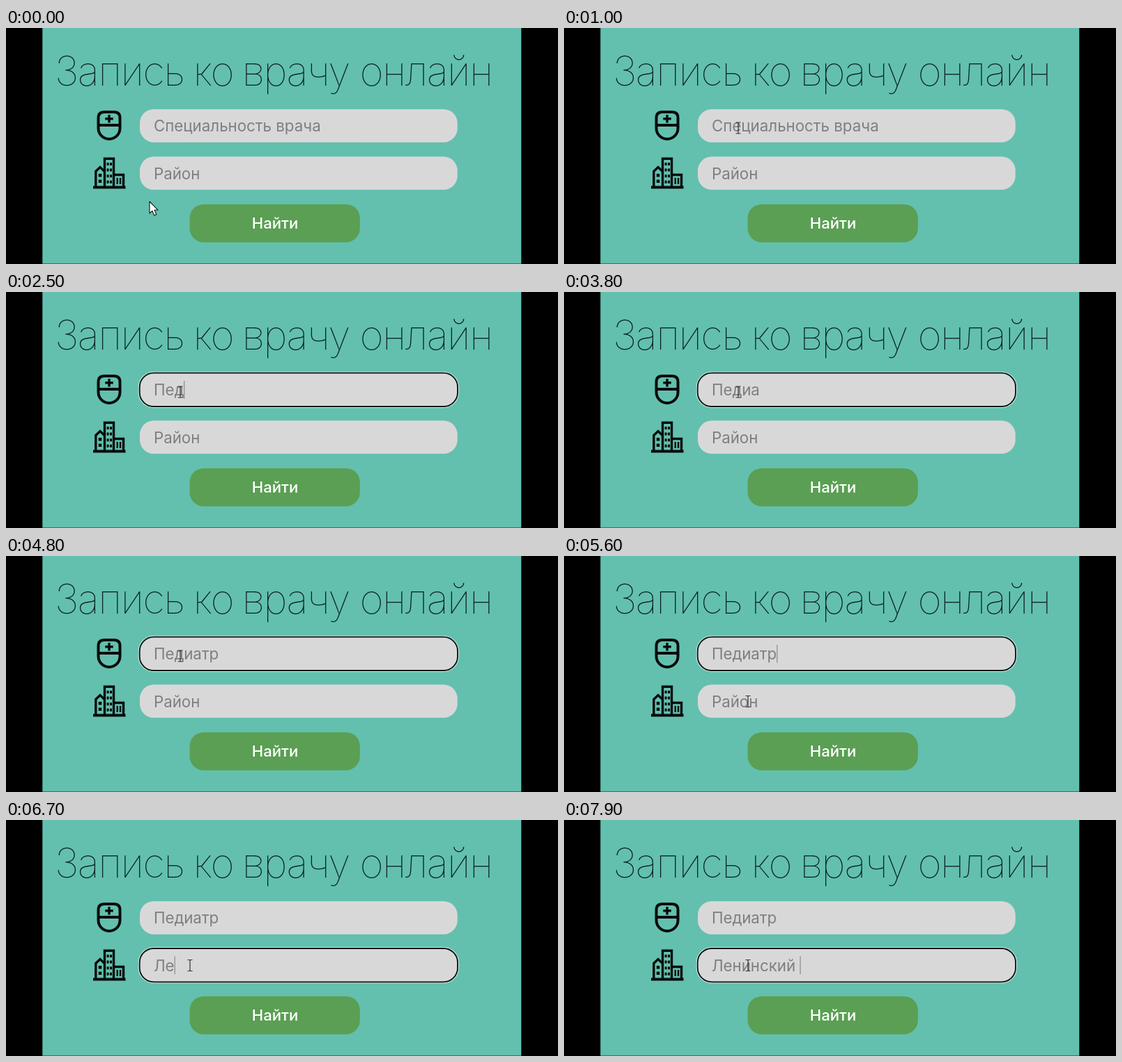
An HTML page for the animation above (8000 ms loop, 792 px wide and 340 px high).

```html
<!DOCTYPE html>
<html lang="ru">
<head>
<meta charset="utf-8">
<title>Запись ко врачу</title>
<style>
  html, body { margin: 0; width: 100%; height: 100%; overflow: hidden; background: #000; }
  svg { display: block; width: 100vw; height: 100vh; }
  text { font-family: Inter, Roboto, sans-serif; font-size: 22.3px; white-space: pre; }
  .title text { font-size: 59px; font-weight: 100; fill: #0c2422; font-optical-sizing: none; letter-spacing: -1.6px; }
  .value { fill: #7f7e80; }
  .button { font-size: 22.1px; font-weight: 500; fill: #fff; }
  .ink { fill: none; stroke: #070b0b; }
</style>
</head>
<body>
<svg viewBox="0 0 792 340">
  <rect width="792" height="340" fill="#000"/>
  <rect x="52.3" width="687" height="339.6" fill="#63c0ae"/>

  <g class="title">
    <text x="70" y="82.5">Запись</text>
    <text x="268.5" y="82.5">ко</text>
    <text x="338.5" y="82.5">врачу</text>
    <text x="507.5" y="82.5">онлайн</text>
  </g>

  <g class="ink" stroke-width="4">
    <path d="M141 121H155Q163.500 121 163.500 129.500V144.500A15.500 15.500 0 0 1 132.500 144.500V129.500Q132.500 121 141 121ZM132.500 140H163.500"/>
    <path d="M148 125V136.500M142.300 130.700H153.700" stroke-width="3.400"/>
  </g>

  <g class="ink" stroke-width="3.400">
    <path d="M125 229.600H171.500" stroke-width="4"/>
    <path d="M128.800 229V206.500L135 200.500L141.300 206.500"/>
    <path d="M141.500 229V188.300H154.500V229"/>
    <path d="M154.500 211.500H168.500V229"/>
    <path d="M146.100 194V224M150.500 194V224" stroke-width="3" stroke-dasharray="4 4.600"/>
    <path d="M135 210V225" stroke-width="4.500" stroke-dasharray="4.500 4"/>
    <path d="M159.700 216V225M164 216V225" stroke-width="2.400"/>
  </g>

  <g id="fields"></g>

  <rect x="263.500" y="254" width="244.300" height="54.700" rx="20" fill="#5a9f53"/>
  <text class="button" x="386" y="289.300" text-anchor="middle">Найти</text>

  <path id="arrow" d="M0 0V17L3.900 13.400L6.700 20L9.800 18.700L7 12.300H12Z" fill="#fff" stroke="#101818" stroke-width="1.100" stroke-linejoin="round"/>
  <path id="beam" d="M-3.500 -8H-1Q0 -8 0 -7Q0 -8 1 -8H3.500M0 -7V7M-3.500 8H-1Q0 8 0 7Q0 8 1 8H3.500" fill="none" stroke="#333" stroke-width="1.200"/>
</svg>

<script>
const LOOP = 8000, STEP = 100, TEXT_X = 211.9;
const root = document.getElementById("fields");
const arrow = document.getElementById("arrow");
const beam = document.getElementById("beam");

function add(tag, attrs, parent) {
  const el = document.createElementNS("http://www.w3.org/2000/svg", tag);
  for (const key in attrs) el.setAttribute(key, attrs[key]);
  return parent.appendChild(el);
}

// typed: [time, letters]; caretOn: [on, off] spans
function makeField(y, spec) {
  const box = (grow, attrs) => add("rect", {
    x: 192 - grow, y: y - grow, width: 455.7 + 2 * grow, height: 47.7 + 2 * grow, rx: 20 + grow, ...attrs
  }, root);
  box(0, { fill: "#d9d8d9" });
  const rings = [
    box(1.7, { fill: "none", stroke: "#eef8f5", "stroke-width": 1.1, opacity: 0.8 }),
    box(0.3, { fill: "none", stroke: "#0c1213", "stroke-width": 1.8 })
  ];
  const text = add("text", { x: TEXT_X, y: y + 32.3, class: "value" }, root);
  const caret = add("rect", { y: y + 11, width: 1.1, height: 26, fill: "#858485" }, root);
  return { ...spec, y, rings, text, caret };
}

const fields = [
  makeField(117, {
    hint: "Специальность врача", word: "Педиатр", focus: [1200, 5700],
    typed: [[1600, 1], [2300, 2], [2500, 3], [2900, 4], [3000, 5], [4300, 7]],
    caretOn: [[1200, 1400], [1600, 2000], [2300, 3800], [4300, 4800], [5300, 5700]]
  }),
  makeField(185.3, {
    hint: "Район", word: "Ленинский\u00a0", focus: [5700, LOOP],
    typed: [[6700, 2], [6900, 3], [7200, 5], [7400, 6], [7500, 7], [7600, 8], [7900, 10]],
    caretOn: [[5700, 6000], [6700, LOOP]]
  })
];

const within = (t, [from, to]) => t >= from && t < to;
const show = (el, on) => el.setAttribute("visibility", on ? "visible" : "hidden");

function drawField(f, t) {
  const count = f.typed.reduce((n, [at, len]) => t >= at ? len : n, 0);
  const value = f.word.slice(0, count);
  const label = value || f.hint;
  if (f.text.textContent !== label) f.text.textContent = label;
  f.rings.forEach(r => show(r, within(t, f.focus)));
  f.caret.setAttribute("x", TEXT_X + (value ? f.text.getComputedTextLength() : 0));
  show(f.caret, f.caretOn.some(span => within(t, span)));
}

const moves = [
  { from: [206, 250], to: [250, 144], start: 0, end: 800 },
  { from: [250, 144], to: [264, 209.5], start: 4900, end: 5300 }
];

function pointer(t) {
  const m = t < moves[1].start ? moves[0] : moves[1];
  const p = Math.min(1, Math.max(0, (t - m.start) / (m.end - m.start)));
  const e = p * p * (3 - 2 * p);
  return m.from.map((a, i) => a + (m.to[i] - a) * e);
}

function draw(time) {
  const t = Math.floor((time % LOOP) / STEP) * STEP;
  fields.forEach(f => drawField(f, t));
  const [x, y] = pointer(t);
  const overField = fields.some(f => y >= f.y && y <= f.y + 48);
  for (const el of [arrow, beam]) el.setAttribute("transform", `translate(${x} ${y})`);
  show(beam, overField);
  show(arrow, !overField);
}

const begin = performance.now();
function tick() {
  draw(performance.now() - begin);
  requestAnimationFrame(tick);
}
tick();
</script>
</body>
</html>
```
